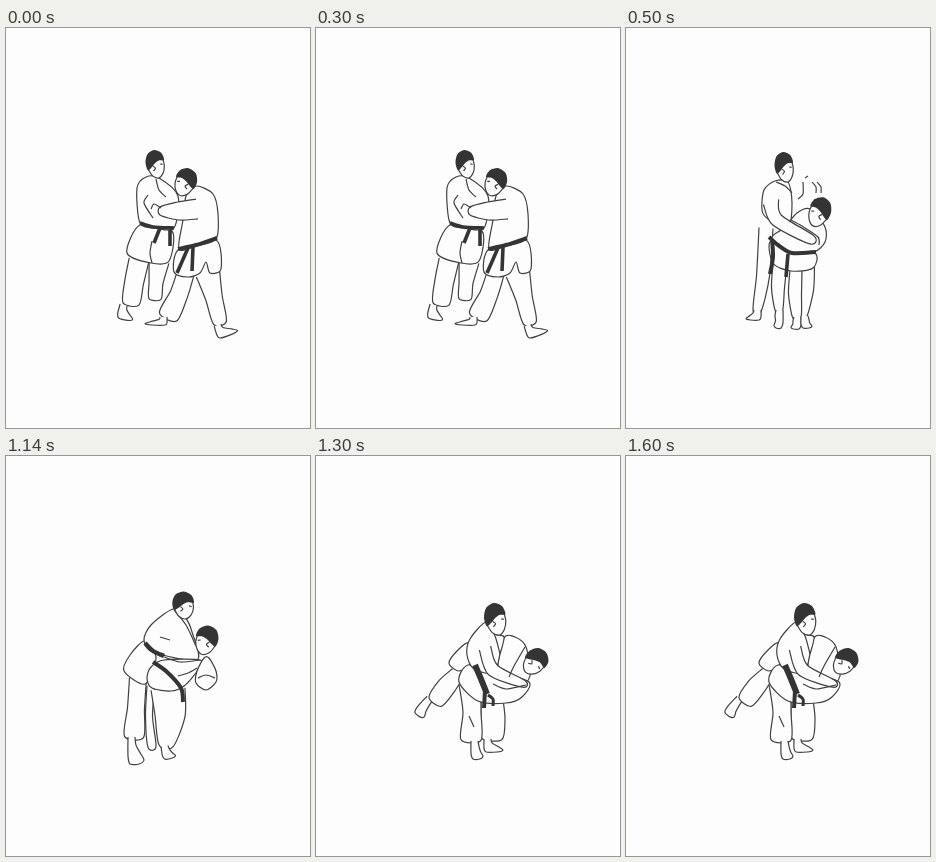
Animation of 304x400 px, one loop 1.8 s. Source, as an HTML page with a canvas:

```html
<!DOCTYPE html>
<html lang="en">
<head>
<meta charset="utf-8">
<title>Judo throw</title>
<style>
html, body { margin: 0; width: 100%; height: 100%; overflow: hidden; background: #fdfdfd; }
canvas { display: block; width: 304px; height: 400px; filter: blur(0.45px); }
</style>
</head>
<body>
<canvas id="stage" width="304" height="400"></canvas>
<script>
const ctx = document.getElementById('stage').getContext('2d');
const PAPER = '#fdfdfd', INK = '#404040', DARK = '#343434';

// Smooth curve through [x, y] points.
function trace(pts, closed) {
  const n = pts.length;
  const at = i => pts[closed ? (i + n) % n : Math.max(0, Math.min(n - 1, i))];
  ctx.beginPath();
  ctx.moveTo(...pts[0]);
  for (let i = 0; i < (closed ? n : n - 1); i++) {
    const [a, b, c, d] = [at(i - 1), at(i), at(i + 1), at(i + 2)];
    ctx.bezierCurveTo(
      b[0] + (c[0] - a[0]) / 7, b[1] + (c[1] - a[1]) / 7,
      c[0] - (d[0] - b[0]) / 7, c[1] - (d[1] - b[1]) / 7, ...c);
  }
}

function stroke(width, color) {
  ctx.lineWidth = width;
  ctx.strokeStyle = color;
  ctx.stroke();
}

function fill(color) {
  ctx.fillStyle = color;
  ctx.fill();
}

function line(...pts) {
  trace(pts);
  stroke(1.2, INK);
}

function belt(width, ...pts) {
  trace(pts);
  stroke(width, DARK);
}

// Cloth covers whatever lies behind it.
function cloth(...pts) {
  trace(pts, true);
  fill(PAPER);
  stroke(1.2, INK);
}

// Sleeve or trouser leg: a centre line with a width at each joint, open at the top.
function limb(joints, widths) {
  const side = s => joints.map(([x, y], i) => {
    const a = joints[Math.max(0, i - 1)], b = joints[Math.min(joints.length - 1, i + 1)];
    const dx = b[0] - a[0], dy = b[1] - a[1];
    const k = s * widths[i] / 2 / Math.hypot(dx, dy);
    return [x - dy * k, y + dx * k];
  });
  trace([...side(1), ...side(-1).reverse()]);
  fill(PAPER);
  stroke(1.2, INK);
}

function local(x, y, tilt, dir, paint) {
  ctx.save();
  ctx.translate(x, y);
  ctx.rotate(tilt);
  ctx.scale(dir, 1);
  paint();
  ctx.restore();
}

// Negative length points the toes to the left.
function foot(x, y, length, h, tilt = 0) {
  const l = Math.abs(length);
  local(x, y, tilt, Math.sign(length), () => {
    trace([[-4, 0], [-4, h * 0.7], [-2, h], [l * 0.6, h], [l, h * 0.85], [l * 0.7, h * 0.6], [4, h * 0.3], [3, 0]]);
    fill(PAPER);
    stroke(1.2, INK);
  });
}

// Profile with a cap of hair over the top and back.
function head(x, y, rx, ry, dir, tilt = 0) {
  const p = (u, v) => [u * rx, v * ry];
  local(x, y, tilt, dir, () => {
    trace([p(0.8, -0.4), p(0.98, 0.1), p(0.85, 0.65), p(0.4, 1), p(-0.25, 0.85), p(-0.7, 0.4)]);
    fill(PAPER);
    stroke(1.2, INK);
    trace([p(-0.75, 0.45), p(-1, -0.1), p(-0.8, -0.7), p(-0.1, -1), p(0.65, -0.8),
      p(0.95, -0.3), p(0.4, -0.25), p(0, -0.05), p(-0.3, 0.2)], true);
    fill(DARK);
    line(p(-0.2, 0.15), p(0.05, 0.3), p(-0.15, 0.5));
    line(p(0.55, 0), p(0.8, 0.02));
  });
}

function grip() {
  limb([[153, 234], [150, 255], [149, 271]], [20, 14, 12]);
  limb([[133, 232], [128, 255], [125, 276]], [20, 19, 16]);
  foot(118, 277, 12, 14, 0.25);
  cloth([134, 197], [121, 225], [145, 235], [163, 233], [166, 203]);
  line([146, 213], [144, 225], [146, 235]);
  cloth([140, 149], [131, 160], [134, 195], [150, 200], [168, 200], [172, 168], [153, 150]);
  line([150, 151], [153, 162], [160, 169]);
  line([142, 167], [138, 175], [147, 190]);
  head(149, 136, 9.5, 14, 1);
  belt(3.6, [134, 195], [147, 199], [168, 200]);
  belt(3.6, [154, 200], [148, 215]);
  belt(3.6, [164, 202], [164, 218]);

  limb([[180, 244], [173, 266], [162, 289]], [17, 18, 19]);
  limb([[202, 246], [208, 270], [214, 295]], [24, 17, 13]);
  foot(157, 289, -18, 8);
  foot(212, 297, 17, 13, -0.3);
  cloth([173, 221], [168, 244], [182, 249], [194, 245], [200, 234], [204, 245], [215, 241], [210, 212]);
  cloth([190, 158], [207, 166], [212, 186], [210, 211], [190, 218], [173, 221], [177, 192], [180, 168]);
  limb([[191, 181], [172, 183], [154, 183]], [20, 18, 8]);
  line([145, 181], [148, 176], [155, 180]);
  head(180, 154, 11, 14, -1, 0.1);
  belt(4, [172, 221], [190, 217], [211, 210]);
  belt(3.6, [182, 220], [171, 245]);
  belt(3.6, [187, 219], [186, 243]);
}

function turn() {
  limb([[140, 200], [137, 248], [131, 283]], [14, 13, 8]);
  foot(131, 282, -11, 10);
  cloth([149, 153], [138, 162], [136, 182], [142, 191], [162, 199], [166, 175], [162, 154]);
  line([150, 154], [159, 158], [166, 165]);
  head(158, 139, 9.5, 15, 1);

  limb([[182, 238], [181, 262], [177, 289]], [13, 13, 7]);
  limb([[170, 242], [169, 266], [171, 290]], [12, 13, 8]);
  limb([[154, 236], [152, 260], [153, 283]], [14, 13, 7]);
  foot(153, 282, -5, 18);
  foot(171, 289, -6, 12);
  foot(179, 288, 7, 12);
  cloth([146, 212], [147, 235], [165, 243], [187, 240], [188, 224]);
  cloth([184, 181], [171, 185], [158, 200], [146, 210], [165, 225], [188, 224], [199, 214], [199, 199]);
  limb([[145, 174], [151, 192], [186, 212]], [16, 13, 9]);
  line([165, 192], [176, 198], [192, 209], [193, 217]);
  line([172, 171], [177, 166], [177, 154]);
  for (const x of [186, 191]) line([x, 154], [x + 4, 159], [x + 4, 165]);
  line([179, 150], [182, 148]);
  head(194, 184, 11, 15, -1, 0.15);
  belt(4, [143, 209], [152, 217], [166, 225], [190, 224]);
  belt(4, [146, 211], [147, 229], [144, 246]);
  belt(3.6, [162, 226], [160, 249]);
}

function load() {
  limb([[145, 230], [143, 260], [146, 291]], [8, 7, 8]);
  limb([[132, 222], [130, 252], [128, 281]], [17, 17, 19]);
  foot(126, 281, 12, 27);
  cloth([139, 185], [124, 199], [118, 215], [139, 228], [150, 202]);
  cloth([167, 153], [145, 169], [138, 184], [147, 196], [191, 204], [186, 176], [179, 161]);
  line([168, 154], [180, 169], [190, 190]);
  line([154, 181], [164, 184]);
  head(177, 149, 11, 13.5, 1, 0.15);
  belt(4.5, [139, 187], [147, 195], [158, 200]);

  limb([[162, 233], [164, 260], [160, 290]], [34, 30, 14]);
  foot(159, 290, 9, 13, -0.15);
  cloth([158, 204], [145, 211], [141, 222], [146, 232], [165, 235], [178, 230], [192, 214], [194, 204]);
  line([158, 201], [174, 206], [194, 204]);
  line([172, 220], [182, 217], [191, 212]);
  cloth([198, 202], [191, 215], [190, 227], [200, 234], [210, 226], [210, 215], [203, 202]);
  line([192, 222], [200, 219], [209, 222]);
  head(201, 184, 11.5, 14.5, -1);
  belt(4, [147, 206], [160, 215], [175, 232], [177, 246]);
}

function lift() {
  foot(114, 243, 8, 20, 0.75);
  limb([[142, 217], [130, 231], [119, 246]], [14, 19, 15]);
  cloth([153, 187], [142, 194], [133, 207], [143, 215], [155, 207]);
  limb([[176, 244], [177, 263], [176, 283]], [22, 24, 20]);
  limb([[154, 228], [156, 256], [155, 284]], [22, 18, 20]);
  foot(172, 283, 15, 13);
  foot(159, 285, 8, 18);
  line([153, 260], [158, 271]);

  cloth([188, 182], [199, 181], [210, 191], [214, 220], [202, 230], [182, 217]);
  cloth([152, 209], [143, 226], [162, 245], [190, 247], [206, 241], [213, 226], [180, 216]);
  cloth([170, 166], [154, 183], [151, 199], [158, 213], [178, 217], [184, 198], [188, 181], [179, 178]);
  line([171, 168], [179, 180], [184, 198]);
  limb([[169, 192], [177, 214], [208, 228]], [12, 13, 7]);
  line([177, 228], [190, 233], [210, 229]);
  line([209, 191], [198, 210], [193, 221]);
  head(179, 163, 11, 16, 1);
  head(219, 205, 11.5, 14, 1, 1);
  belt(6, [159, 209], [165, 223], [171, 238]);
  belt(4, [169, 235], [168, 252]);
  belt(3, [172, 239], [177, 243], [177, 250]);
}

const LOOP = 1800;
const poses = [[0, grip], [500, turn], [900, load], [1300, lift]];
const start = performance.now();

function draw(now) {
  const t = Math.max(0, now - start) % LOOP;
  ctx.fillStyle = PAPER;
  ctx.fillRect(0, 0, 304, 400);
  ctx.lineJoin = 'round';
  poses.findLast(([from]) => t >= from)[1]();
  requestAnimationFrame(draw);
}
draw(start);
</script>
</body>
</html>
```
